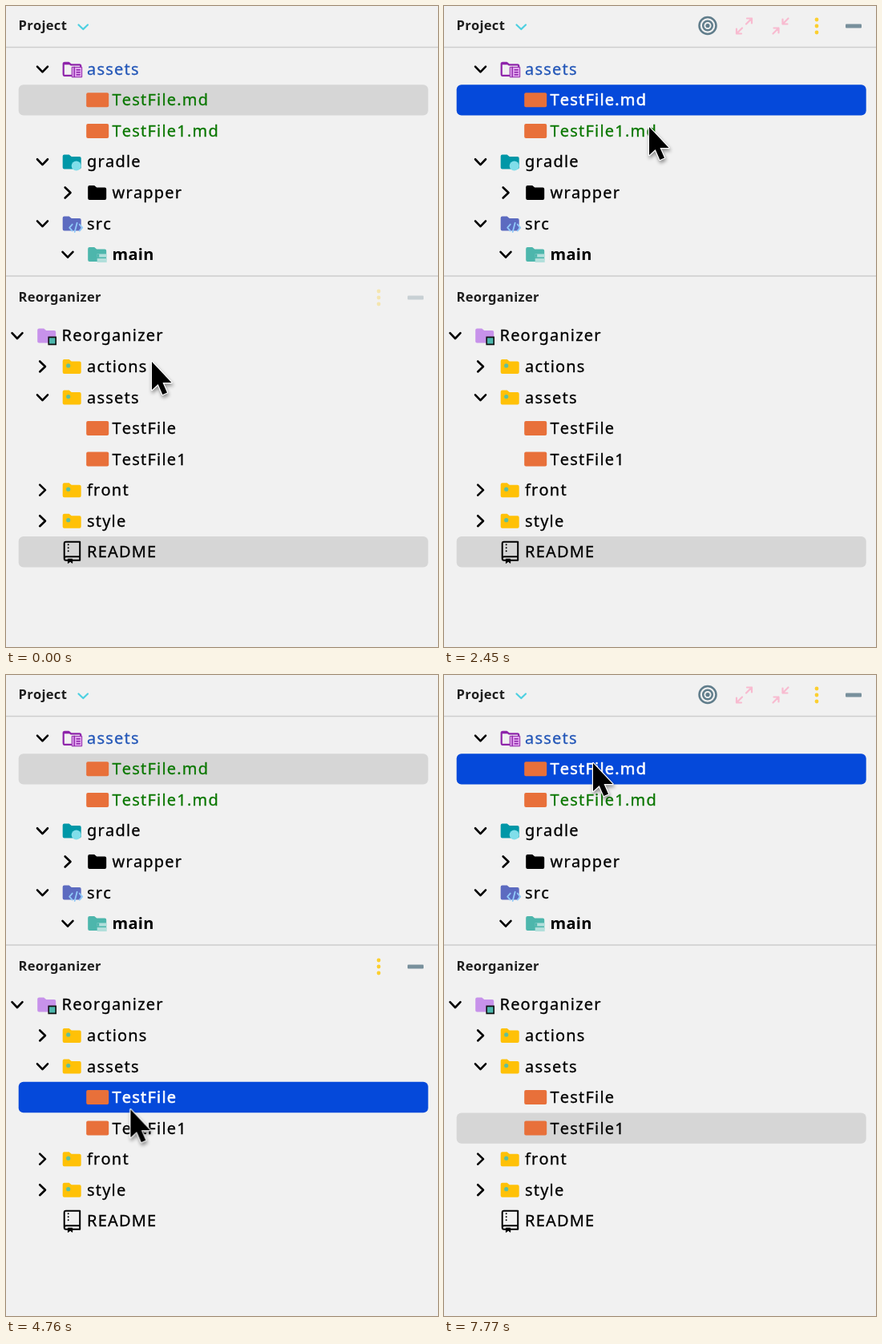
An HTML page that plays this animation: 539x800 px, repeating every 8 s.

```html
<!DOCTYPE html>
<html lang="en">
<head>
<meta charset="utf-8">
<title>Project tree</title>
<style>
  html, body { margin: 0; width: 100%; height: 100%; overflow: hidden; background: #f1f1f1; }
  svg { display: block; width: 100vw; height: 100vh; }
  text { font: 20px "Noto Sans", "Open Sans", sans-serif; font-kerning: none; letter-spacing: 1.2px; fill: currentColor; white-space: pre; }
  .title { font-size: 16.5px; font-weight: 700; letter-spacing: .3px; fill: #1e1e1e; }
  .bold { font-weight: 700; letter-spacing: .3px; }
  .line { fill: none; stroke-linecap: round; stroke-linejoin: round; }

  .row, #tip { color: #000; stroke-width: .3px; }
  .row { fill: transparent; animation: 8s step-end infinite; }
  .row > text, #tip > text { stroke: currentColor; }
  .row > .bold { stroke: none; }
  .blue { color: #2457b8; }
  .green { color: #0a7700; }
  .source { animation-name: source; }
  .first { animation-name: first; }
  .second { animation-name: second; }
  .readme { animation-name: readme; }

  @keyframes source {
    0%, 48.125% { fill: #d6d6d6; color: #0a7700; stroke-width: .3px; }
    16.625%, 93.75%, 100% { fill: #0549da; color: #fff; stroke-width: .55px; }
  }
  @keyframes first {
    0%, 66.625%, 100% { fill: transparent; color: #000; stroke-width: .3px; }
    48.125% { fill: #0549da; color: #fff; stroke-width: .55px; }
  }
  @keyframes second {
    0% { fill: transparent; color: #000; stroke-width: .3px; }
    66.625% { fill: #0549da; color: #fff; stroke-width: .55px; }
    93.75%, 100% { fill: #d6d6d6; color: #000; stroke-width: .3px; }
  }
  @keyframes readme {
    0% { fill: #d6d6d6; }
    48.125%, 100% { fill: transparent; }
  }

  #upperTools { animation: upperTools 8s linear infinite; }
  #lowerTools { animation: lowerTools 8s linear infinite; }
  @keyframes upperTools {
    0%, 5.6% { opacity: 0; }
    8.1%, 48.125% { opacity: 1; }
    51.2%, 89% { opacity: 0; }
    91.5%, 100% { opacity: 1; }
  }
  @keyframes lowerTools {
    0% { opacity: .33; }
    1.4%, 5.8% { opacity: 1; }
    8.6%, 39.5% { opacity: 0; }
    42%, 93.75% { opacity: 1; }
    96.5%, 100% { opacity: 0; }
  }

  #tip { animation: tip 8s step-end infinite; filter: drop-shadow(0 9px 9px #0007); }
  @keyframes tip {
    0%, 88.1%, 100% { visibility: hidden; }
    83.1% { visibility: visible; }
  }

  #cursor { animation: cursor 8s ease-in-out infinite; filter: drop-shadow(1px 3px 2px #0006); }
  @keyframes cursor {
    0%, .8% { transform: translate(182px, 444px); }
    12.2% { transform: translate(212px, 116px); }
    17%, 21.5% { transform: translate(211px, 117px); }
    30.6% { transform: translate(256px, 151px); }
    47.6%, 59% { transform: translate(155px, 542px); }
    66.3%, 69.8% { transform: translate(200px, 561px); }
    79.6%, 84.2% { transform: translate(149px, 539px); }
    93.2%, 100% { transform: translate(186px, 110px); }
  }
</style>
</head>
<body>
<svg viewBox="0 0 539 800" preserveAspectRatio="none">
  <defs>
    <path id="folder" d="M2.5 .5H8.5L11.5 3H21.5Q23.5 3 23.5 5V16.5Q23.5 18.5 21.5 18.5H2.5Q.5 18.5 .5 16.5V2.5Q.5 .5 2.5 .5Z"/>
    <path id="down" class="line" stroke="#000" stroke-width="2.6" d="M-6.5-3.2L0 3.6L6.5-3.2"/>
    <path id="right" class="line" stroke="#000" stroke-width="2.6" d="M-3.3-6.5L3.5 0L-3.3 6.5"/>

    <g id="library">
      <path class="line" stroke="#8e24aa" stroke-width="2.2" d="M11 17.5H2.5Q1.5 17.5 1.5 16V3Q1.5 1.5 3 1.5H8L11 4H21.5Q23 4 23 5.5V7"/>
      <path fill="#8e24aa" d="M1.5 1.5H8L11 4H1.5Z"/>
      <path fill="#e1a5ee" stroke="#8e24aa" stroke-width="1" d="M12 7H24.5V19.5H12Z"/>
      <path class="line" stroke="#8e24aa" stroke-width="1.4" d="M15 7V19M18 10.5H22M18 13.5H22M18 16.5H22"/>
    </g>
    <g id="build">
      <use href="#folder" fill="#0097a7"/>
      <circle cx="17.5" cy="14.5" r="6" fill="#80deea"/>
    </g>
    <use id="plain" href="#folder" fill="#000"/>
    <g id="code">
      <use href="#folder" fill="#5c6bc0"/>
      <path class="line" stroke="#90caf9" stroke-width="1.8" d="M12.5 10.5L9 14.5L12.5 18.5M18.5 8.5L15.5 20M21.5 10.5L25 14.5L21.5 18.5"/>
    </g>
    <g id="module">
      <use href="#folder" fill="#4db6ac"/>
      <path fill="#b2dfdb" d="M12 9H24V13H12ZM12 14.5H24V19.5H12Z"/>
      <path fill="#4db6ac" d="M12 9H14.5V13H12Z"/>
    </g>
    <g id="root">
      <use href="#folder" fill="#c792ea"/>
      <path fill="#4db6ac" stroke="#111" stroke-width="1.6" d="M14.5 11.5H23.5V20.5H14.5Z"/>
    </g>
    <g id="group">
      <use href="#folder" fill="#ffc107"/>
      <circle cx="7.5" cy="8.5" r="2.6" fill="#5fbf9c"/>
    </g>
    <rect id="file" x="-1.5" y=".5" width="28" height="18" rx="2" fill="#e8703a"/>
    <g id="book" class="line" stroke="#000" stroke-width="2">
      <path d="M7 20H4.5Q2.5 20 2.5 17.5V-1Q2.5-3 4.5-3H22V20H13M2.5 17Q3 15.5 5 15.5H22"/>
      <path stroke-dasharray="0 4" d="M7.5 .5V12.5"/>
      <path fill="#000" stroke-width="1" d="M7.5 18.5H12.5V23.5L10 21.5L7.5 23.5Z"/>
    </g>
    <g id="menu">
      <g fill="#fccf2f"><circle cy="-8" r="2.4"/><circle r="2.4"/><circle cy="8" r="2.4"/></g>
      <rect x="36" y="-2.5" width="20" height="5" rx="1" fill="#78909c"/>
    </g>
    <path id="arrow" class="line" stroke="#f8bbd0" stroke-width="2.2" d="M2.5-2.5L9.5-9.5M3.5-9.5H9.5V-3.5"/>
    <path id="inward" class="line" stroke="#f8bbd0" stroke-width="2.2" d="M9.5-9.5L2.5-2.5M2.5-8.5V-2.5H8.5"/>
  </defs>

  <rect width="539" height="800" fill="#f1f1f1"/>
  <path stroke="#cecece" stroke-width="1.6" d="M0 51.5H539M0 337H539"/>
  <text class="title" x="15.5" y="30">Project</text>
  <text class="title" x="15.5" y="369">Reorganizer</text>
  <path class="line" stroke="#4dd0e1" stroke-width="2.2" d="M90.5 23.5L96.3 29L102 23.5"/>

  <g id="upperTools">
    <g fill="none" stroke="#607d8b" stroke-width="2.5">
      <circle cx="329" cy="24.5" r="10.5"/><circle cx="329" cy="24.5" r="5.8"/>
    </g>
    <circle cx="329" cy="24.5" r="2.6" fill="#607d8b"/>
    <g transform="translate(374.5 25)"><use href="#arrow"/><use href="#arrow" transform="rotate(180)"/></g>
    <g transform="translate(420 25)"><use href="#inward"/><use href="#inward" transform="rotate(180)"/></g>
    <use href="#menu" x="465" y="25"/>
  </g>
  <use id="lowerTools" href="#menu" x="465" y="364"/>

  <g id="tree"></g>

  <g id="tip">
    <rect x="146.5" y="589.5" width="420" height="78" rx="6" fill="#f3f3f3" stroke="#666" stroke-width="1"/>
    <text x="175" y="632">/Users/hobinwelgo/program/code/</text>
  </g>

  <path id="cursor" fill="#000" stroke="#fff" stroke-width="2.4" stroke-linejoin="round" paint-order="stroke"
        d="M0 0V35L7.7 28L13.4 41L19 38.5L13.5 26H24.5Z"/>
</svg>
<script>
  const PITCH = 38.55;

  // Each row: depth, chevron, icon, label, state class, weight class
  const upper = [
    [1, "down", "library", "assets", "blue"],
    [2, "", "file", "TestFile.md", "source"],
    [2, "", "file", "TestFile1.md", "green"],
    [1, "down", "build", "gradle"],
    [2, "right", "plain", "wrapper"],
    [1, "down", "code", "src"],
    [2, "down", "module", "main", "", "bold"],
  ];
  const lower = [
    [0, "down", "root", "Reorganizer"],
    [1, "right", "group", "actions"],
    [1, "down", "group", "assets"],
    [2, "", "file", "TestFile", "first"],
    [2, "", "file", "TestFile1", "second"],
    [1, "right", "group", "front"],
    [1, "right", "group", "style"],
    [1, "", "book", "README", "readme"],
  ];

  const renderRows = (rows, top) => rows.map(([depth, chevron, icon, label, state = "", weight = ""], i) => {
    const x = depth * 31.5;
    return `<g class="row ${state}" transform="translate(0 ${top + i * PITCH})">
      <rect x="15.7" y="-19.2" width="511" height="38.4" rx="6"/>
      ${chevron && `<use href="#${chevron}" x="${x + 14}"/>`}
      <use href="#${icon}" x="${x + 38.7}" y="-9.5"/>
      <text class="${weight}" x="${x + 69.5}" y="7">${label}</text>
    </g>`;
  }).join("");

  document.getElementById("tree").innerHTML = renderRows(upper, 78.8) + renderRows(lower, 411.4);
</script>
</body>
</html>
```
